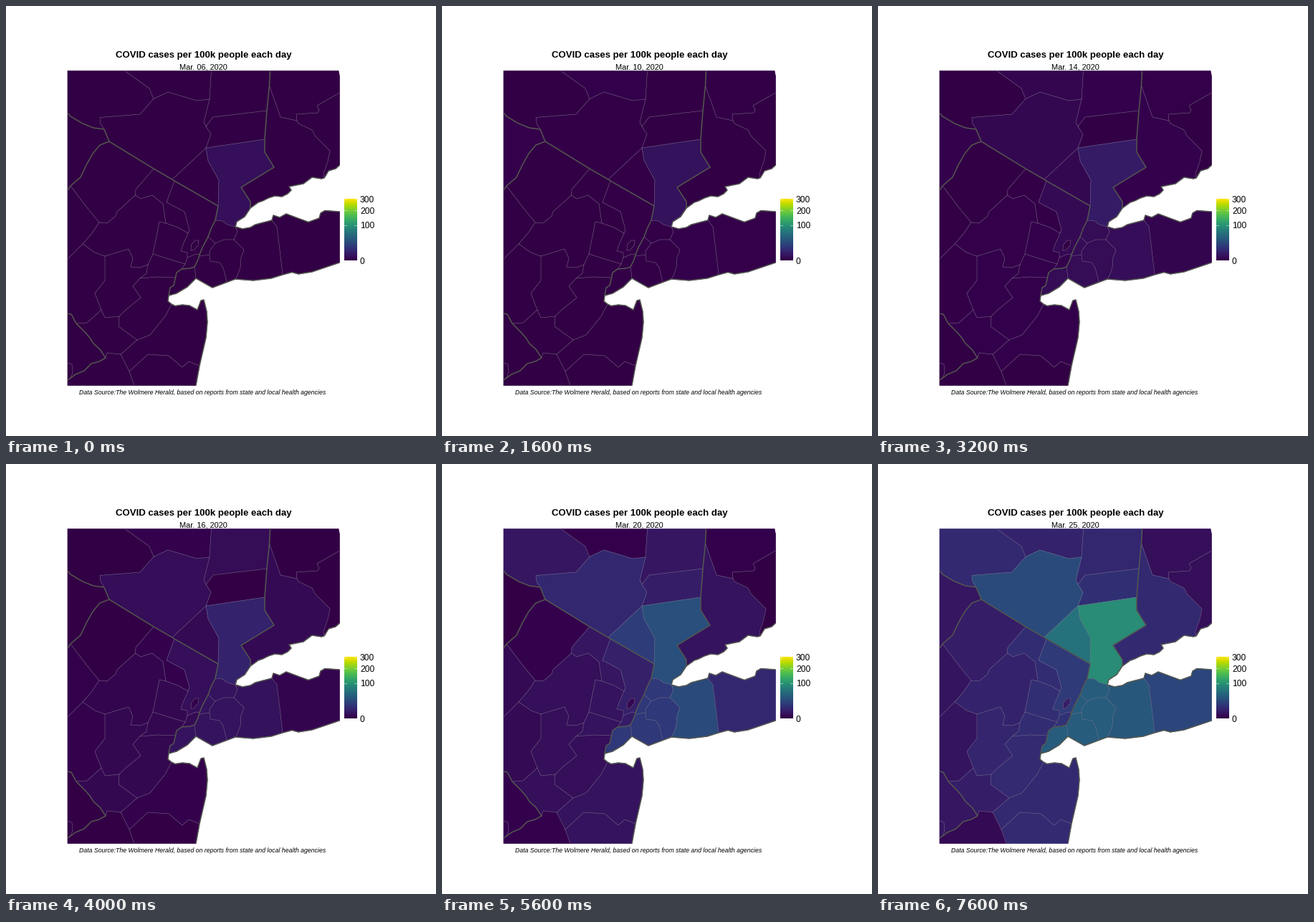
A matplotlib script that plays this animation: 600 px wide and 600 px high, repeating every 8000 ms.

```python
import numpy as np
import matplotlib
import matplotlib.pyplot as plt
from matplotlib.animation import FuncAnimation
from matplotlib.patches import Polygon

plt.rcParams["font.family"] = "Liberation Sans"
PT = 0.72  # points per pixel at 100 dpi
LEFT, RIGHT, TOP, BOTTOM = 86, 465.5, 90.5, 529.5
DAYS = [2, 6, 10, 14, 16, 19]
STATE, COUNTY = "#545850", "#7d748c"

fig = plt.figure(figsize=(6, 6), dpi=100, facecolor="white")
ax = fig.add_axes([0, 0, 1, 1])
ax.axis("off")


def shade(level):
    """Viridis, moved to a display space with gamma 1.8."""
    rgb = np.asarray(matplotlib.colormaps["viridis"](level))[..., :3]
    linear = np.where(rgb <= 0.04045, rgb / 12.92, ((rgb + 0.055) / 1.055) ** 2.4)
    mix = np.array([[0.934, 0.077, -0.011],
                    [-0.023, 1.040, -0.017],
                    [-0.001, -0.032, 1.033]])
    return np.clip(linear @ mix.T, 0, 1) ** (1 / 1.8)


arcs = {}
regions = []


def arc(name, *xy, style="county"):
    points = np.array(xy, float).reshape(-1, 2)
    arcs[name] = points
    if style == "state":
        ax.plot(*points.T, color=STATE, lw=1.5 * PT, zorder=4,
                solid_joinstyle="round", solid_capstyle="butt")
    elif style == "county":
        ax.plot(*points.T, color=COUNTY, lw=0.55 * PT, alpha=0.85, zorder=3)


def state(name, *xy):
    arc(name, *xy, style="state")


def ring(names):
    """Join arcs end to end, flipping each where needed."""
    first, *rest = [arcs[n] for n in names.split()]
    if not rest:
        return first

    def gap(p):
        return min(np.hypot(*(p - rest[0][0])), np.hypot(*(p - rest[0][-1])))

    points = list(first[::-1] if gap(first[0]) < gap(first[-1]) else first)
    for part in rest:
        near = np.hypot(*(part[0] - points[-1])) <= np.hypot(*(part[-1] - points[-1]))
        points.extend(part if near else part[::-1])
    return np.array(points)


def region(names, *levels, start=0):
    """Levels are percent of the colour scale at DAYS."""
    patch = Polygon(ring(names), closed=True, lw=0.7 * PT, zorder=2)
    ax.add_patch(patch)
    regions.append((patch, (start, *levels)))


# Corners of the map window
arc("nw", LEFT, TOP, style="none")
arc("ne", 464, TOP, RIGHT, 98, style="none")
arc("sw", LEFT, BOTTOM, style="none")

# State lines and shores
state("pike", 86, 149, 90, 154, 107, 164, 122, 170, 137, 172)
state("port", 137, 172, 144, 189)
state("gap", 144, 189, 131, 194, 121, 206, 112, 222, 104, 239, 90, 251)
state("gap_w", 90, 251, 86, 257)
state("line_sussex", 144, 189, 206, 227)
state("line_passaic", 206, 227, 232, 242)
state("line_ramapo", 232, 242, 235, 244)
state("line_bergen", 235, 244, 296, 279)
state("hudson_a", 296, 279, 292, 299)
state("hudson_b", 292, 299, 286, 311, 282, 322)
state("hudson_c", 282, 322, 274, 337, 270, 347)
state("hudson_d", 270, 347, 268, 354, 263, 364)
state("kill_a", 263, 364, 257, 366, 245, 367)
state("kill_b", 245, 367, 238, 372, 236.5, 379)
state("kill_c", 236.5, 379, 234, 390, 229, 393, 227, 404)
state("ct_a", 368.5, 90.5, 367.5, 111)
state("ct_b", 367.5, 111, 364, 146)
state("ct_c", 364, 146, 361, 186)
state("ct_d", 361, 186, 361, 204, 374, 225, 328, 253, 341, 273, 341, 282)
state("ct_shore", 341, 282, 352, 274, 358, 272, 366, 268, 375, 265, 385, 266,
      393, 262, 398, 257, 395, 252, 415, 248, 427, 239, 440, 241, 444, 240)
state("ct_shore_e", 444, 240, 450, 230, 460, 227, 465.5, 222)
state("west_shore", 341, 282, 333, 294, 322, 301, 320, 308)
state("sound_a", 320, 308, 330, 311, 341, 309, 348, 305, 371, 299)
state("sound_b", 371, 299, 373, 292, 382, 295, 391, 290, 407, 296, 422, 301.5,
      437, 296, 439, 289, 445, 285.5, 465.5, 287)
state("ocean_a", 465.5, 358, 427, 371, 408, 374, 399, 371.5, 386, 375)
state("ocean_b", 386, 375, 370, 380, 345, 383, 320, 381)
state("ocean_c", 320, 381, 288, 393, 265, 380, 253, 392, 238, 401, 227, 404)
state("raritan", 227, 404, 226, 412, 231, 416)
state("jersey_a", 231, 416, 236, 418.5, 246, 417, 256, 418, 267, 424, 272, 411,
      276, 410, 280, 426, 281, 441, 279, 463, 270, 502)
state("jersey_b", 270, 502, 265, 529.5)
state("penn_a", 86, 429, 91, 430, 98, 443)
state("penn_b", 98, 443, 110, 455, 117, 463, 122, 471, 131, 479, 139, 491)
state("penn_c", 139, 491, 130, 496, 119, 499, 109, 509, 97, 514, 86, 522)

# County lines, north
arc("catskill", 166, 90.5, 200, 115, 206, 129.5)
arc("shawangunk", 206, 129.5, 187, 151, 131, 155.5, 132, 164, 137, 172)
arc("walden", 206, 129.5, 226, 120, 266, 132, 284, 130)
arc("river_a", 286.5, 90.5, 284, 130)
arc("river_b", 284, 130, 276, 162, 279, 168)
arc("river_c", 279, 168, 286, 179, 279, 198)
arc("putnam_n", 279, 168, 289, 155, 364, 146)
arc("putnam_s", 279, 198, 361, 186)
arc("harriman", 279, 198, 232, 242)
arc("tappan", 279, 198, 282, 216, 297, 243, 296, 279)
arc("danbury", 367.5, 111, 383, 155, 406, 160)
arc("naugatuck", 406, 160, 408, 164, 427, 173, 431, 181, 452, 202, 449, 217,
    443, 234, 444, 240)
arc("litch_s", 406, 160, 405, 151, 435, 149, 437, 145, 434, 139, 465.5, 121)

# County lines, city and island
arc("bronx_n", 292, 299, 302, 300, 309, 305, 320, 308)
arc("nassau_w", 320, 308, 323, 315, 318, 326, 332, 340, 328, 351, 327, 365, 323, 376, 320, 381)
arc("nassau_e", 371, 299, 378, 308, 382, 340, 386, 375)
arc("harlem", 282, 322, 292, 331, 304, 326, 318, 326)
arc("east_river", 292, 331, 284, 342, 284, 347, 270, 349)
arc("queens", 284, 347, 285, 356, 298, 358, 303, 365, 308, 385)
arc("bay", 263, 364, 265, 380)

# County lines, west of the river
arc("sussex_e", 206, 227, 181, 256, 180.5, 264)
arc("sussex_s", 180.5, 264, 155, 287, 153, 293, 141, 303, 130, 302)
arc("sussex_w", 90, 251, 112, 280, 130, 302)
arc("warren_e", 130, 302, 120, 317, 107, 332)
arc("warren_s", 107, 332, 86, 353)
arc("pompton", 180.5, 264, 188, 269, 204, 264, 219, 276, 223, 303)
arc("ridge_a", 235, 244, 224, 274, 249, 287, 256, 312, 254, 317)
arc("clifton", 223, 303, 240, 309, 254, 317)
arc("essex_w", 223, 303, 214, 301, 205, 346)
arc("passaic_river", 254, 317, 247, 333, 244, 342, 253, 344, 253, 351)
arc("hudson_n", 253, 351, 265, 346, 270, 347)
arc("newark_bay", 253, 351, 250, 360)
arc("hudson_s", 250, 360, 245, 367)
arc("union_n", 205, 346, 227, 353, 250, 360)
arc("morris_se", 205, 346, 198, 361)
arc("great_swamp", 198, 361, 187, 365, 174, 364)
arc("morris_sw", 174, 364, 177, 352, 171, 339, 138, 349)
arc("hunterdon_n", 107, 332, 124, 344, 138, 349)
arc("union_w", 198, 361, 196, 373, 187, 380)
arc("union_s", 187, 380, 212, 378, 236.5, 379)
arc("hunterdon_e", 138, 349, 138, 383, 124, 401, 133, 424)
arc("hunterdon_s", 133, 424, 113, 442, 98, 443)
arc("somerset_s", 133, 424, 138, 435, 158, 433)
arc("millstone", 158, 433, 167, 424, 188, 407, 177, 391, 187, 380)
arc("mercer_e", 158, 433, 157, 447, 183, 466)
arc("mercer_se", 183, 466, 160, 486)
arc("mercer_s", 160, 486, 141, 484, 139, 491)
arc("monmouth_n", 231, 416, 222, 433, 201, 459, 183, 466)
arc("monmouth_w", 160, 486, 172, 510)
arc("monmouth_s", 172, 510, 198, 486, 227, 488, 246, 504, 255, 496, 270, 502)
arc("ocean_w", 172, 510, 179, 529.5)
arc("philly", 86, 498, 92, 500, 93, 512, 90, 519)
arc("islet", 258, 341, 258.5, 333, 264, 327, 269, 327, 268, 334, 262, 341, 258, 341)

# Fills
region("nw catskill shawangunk pike", 0, 0, 9, 12, 16.5)
region("catskill walden river_a", 4.5, 3, 2.5, 9, 14)
region("river_a river_b putnam_n ct_b ct_a", 0, 5.5, 9, 14, 16)
region("putnam_n ct_c putnam_s river_c", 0, 1, 12, 17, 19)
region("shawangunk walden river_b river_c harriman line_passaic line_sussex port",
       2.5, 6, 16, 24.5, 29)
region("harriman line_ramapo line_bergen tappan", 3, 5, 24, 36, 45)
region("putnam_s ct_d west_shore bronx_n hudson_a tappan", 8.5, 14, 31, 44, 55, start=7)
region("hudson_b hudson_c hudson_d kill_a kill_b kill_c ocean_c nassau_w bronx_n",
       3, 8, 22, 29, 36)
region("sound_a nassau_e ocean_b nassau_w", 4.5, 7.5, 29, 35, 34)
region("sound_b ocean_a nassau_e", 3.5, 3.5, 16, 23.5, 27)
region("ct_a danbury litch_s ne", 3, 0.5, 2, 3, 7)
region("ct_b ct_c ct_d ct_shore naugatuck danbury", 1, 5, 8, 10, 16.5)
region("litch_s naugatuck ct_shore_e", 0, 0.5, 0.5, 3, 7)
region("pike port gap gap_w", 5, 1, 1, 0, 9)
region("gap line_sussex sussex_e sussex_s sussex_w", 0, 0, 3, 7, 12)
region("gap_w sussex_w warren_e warren_s", 0, 2, 5, 7, 8.5)
region("line_passaic line_ramapo ridge_a clifton pompton sussex_e", 0, 3, 9, 15, 18)
region("line_bergen hudson_a hudson_b hudson_c hudson_n passaic_river ridge_a",
       3, 7, 13, 16, 23)
region("sussex_s pompton essex_w morris_se great_swamp morris_sw hunterdon_n warren_e",
       0, 3.5, 7, 15.5, 14)
region("clifton passaic_river newark_bay union_n essex_w", 0, 4, 8, 14, 18.5)
region("hudson_n hudson_d kill_a hudson_s newark_bay", 1, 5, 11, 15, 20)
region("union_n hudson_s kill_b union_s union_w morris_se", 0, 4, 8, 13, 18)
region("morris_sw great_swamp union_w millstone somerset_s hunterdon_e", 0, 4, 7, 9, 15)
region("warren_s hunterdon_n hunterdon_e hunterdon_s penn_a", 0, 3, 5, 7, 8.5)
region("union_s kill_c raritan monmouth_n mercer_e millstone", 0.5, 4, 7, 10, 17)
region("hunterdon_s somerset_s mercer_e mercer_se mercer_s penn_b", 0.5, 4, 7, 8, 12)
region("monmouth_n jersey_a monmouth_s monmouth_w mercer_se", 1, 3, 8, 15, 16.5)
region("monmouth_s jersey_b ocean_w", 0.5, 1, 8, 11, 17)
region("mercer_s monmouth_w ocean_w sw penn_c", 0, 1, 3, 5, 5)
region("penn_a penn_b penn_c", 0, 1, 3, 5, 9)
region("islet", 0, 2, 4, 7, 12)

# Legend: square-root scale from 0 to 300
X0, X1, Y0, Y1 = 471.5, 489, 269.5, 355.5
ax.imshow(shade(np.linspace(1, 0, 300))[:, None, :], extent=[X0, X1, Y1, Y0],
          aspect="auto", interpolation="bilinear")
for value in (300, 200, 100, 0):
    y = Y1 - (Y1 - Y0) * np.sqrt(value / 300)
    for x in (X0, X1 - 3.5):
        ax.plot([x, x + 3.5], [y, y], color="white", lw=0.5 * PT, zorder=5)
    ax.text(494, y + 4.4, str(value), size=12 * PT)

ax.text(275.5, 72, "COVID cases per 100k people each day", size=13.2 * PT,
        weight="bold", ha="center")
date = ax.text(275.5, 88, "", size=11 * PT, ha="center")
ax.text(102, 542, "Data Source:The Wolmere Herald, based on reports from "
        "state and local health agencies", size=8.8 * PT, style="italic")

ax.set_xlim(0, 600)
ax.set_ylim(600, 0)


def update(day):
    date.set_text(f"Mar. {day + 6:02d}, 2020")
    for patch, levels in regions:
        color = shade(np.interp(day, DAYS, levels) / 100)
        patch.set(facecolor=color, edgecolor=color)
    return [date] + [patch for patch, _ in regions]


animation = FuncAnimation(fig, update, frames=20, interval=400, repeat=True, repeat_delay=0)
plt.show()
```
